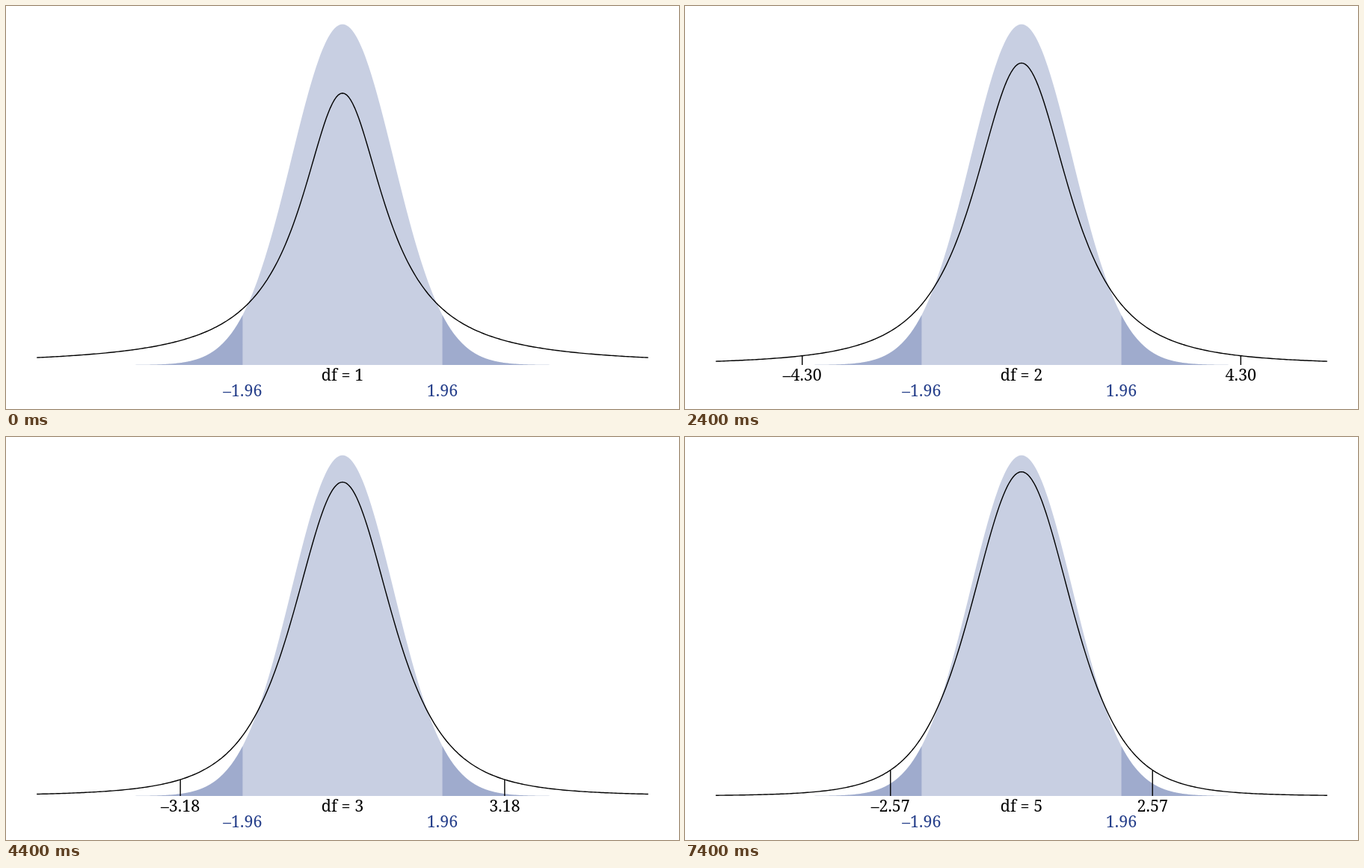
An HTML page that plays this animation: 900x540 px, repeating every 8 s.

```html
<!DOCTYPE html>
<html lang="en">
<head>
<meta charset="utf-8">
<title>Student's t and the normal distribution</title>
<style>
  html, body { margin: 0; width: 100%; height: 100%; overflow: hidden; background: #fff; }
  svg { display: block; width: 100%; height: 100%; }
  text { font: 21.5px "Noto Serif", serif; text-anchor: middle; }
  .normal { fill: #27408b; }
  .area { fill-opacity: .25; }
  .line { fill: none; stroke: #000; stroke-width: 1.4; }
</style>
</head>
<body>
<svg viewBox="0 0 900 540">
  <g class="normal" id="normal"></g>
  <path class="line" id="curve"></path>
  <path class="line" id="ticks"></path>
  <text id="left" y="502"></text>
  <text id="right" y="502"></text>
  <text id="df" x="450" y="502"></text>
</svg>
<script>
const LOOP = 8000, BASE = 481, RANGE = 6, Z = 1.96;
const px = x => 450 + x * 68.15;
const py = density => BASE - density * 1144.3;
const byId = id => document.getElementById(id);

const normal = x => Math.exp(-x * x / 2) / Math.sqrt(2 * Math.PI);

// Peak density and two-sided 5% critical value for each degree of freedom
const peaks = [0, 1 / Math.PI, 0.353553, 0.367553, 0.375, 0.379607];
const critical = [0, 12.706, 4.303, 3.182, 2.776, 2.571];
const student = (x, df) => peaks[df] * (1 + x * x / df) ** (-(df + 1) / 2);

// Each step shows the mean of two neighbouring distributions, or a single one
const steps = [
  { at: 0, from: 1, to: 1 },
  { at: 1000, from: 1, to: 2 },
  { at: 1500, from: 2, to: 2 },
  { at: 3000, from: 2, to: 3 },
  { at: 3500, from: 3, to: 3 },
  { at: 5000, from: 4, to: 4 },
  { at: 6500, from: 5, to: 5 }
];

function plot(density, from, to) {
  const points = [];
  for (let i = 0; i <= 300; i++) {
    const x = from + (to - from) * i / 300;
    points.push(px(x).toFixed(2) + "," + py(density(x)).toFixed(2));
  }
  return "M" + points.join("L");
}

function area(from, to) {
  const d = `${plot(normal, from, to)}L${px(to)},${BASE}L${px(from)},${BASE}Z`;
  return `<path class="area" d="${d}"/>`;
}

byId("normal").innerHTML =
  area(-RANGE, RANGE) + area(-RANGE, -Z) + area(Z, RANGE) +
  `<text x="${px(-Z)}" y="523">–${Z}</text><text x="${px(Z)}" y="523">${Z}</text>`;

function show({ from, to }) {
  const density = x => (student(x, from) + student(x, to)) / 2;
  const cut = (critical[from] + critical[to]) / 2;
  const visible = cut < RANGE;
  const tick = x => `M${px(x)},${py(density(x))}V${BASE}`;
  const label = critical[to].toFixed(2);

  byId("curve").setAttribute("d", plot(density, -RANGE, RANGE));
  byId("ticks").setAttribute("d", visible ? tick(-cut) + tick(cut) : "");
  byId("left").setAttribute("x", px(-cut));
  byId("right").setAttribute("x", px(cut));
  byId("left").textContent = visible ? "–" + label : "";
  byId("right").textContent = visible ? label : "";
  byId("df").textContent = "df = " + to;
}

let current;
function frame() {
  const time = performance.now() % LOOP;
  const step = steps.findLast(s => s.at <= time);
  if (step !== current) show(current = step);
  requestAnimationFrame(frame);
}
frame();
</script>
</body>
</html>
```
